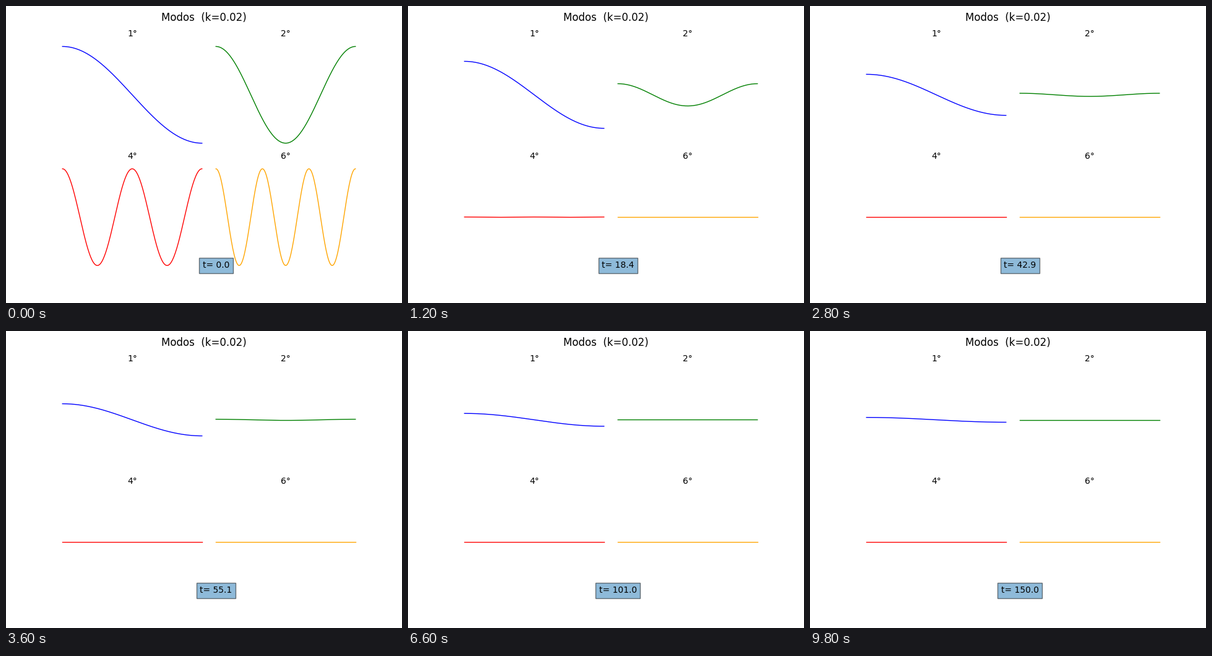
Animation, 640 px wide and 480 px high, one loop 10 s. Source, as a matplotlib script:

```python
import numpy as np
import matplotlib.pyplot as plt
from matplotlib.animation import FuncAnimation

K = 0.02
FRAMES = 50
MODES = {1: "blue", 2: "green", 4: "red", 6: "orange"}

x = np.linspace(0, 1, 200)
times = np.linspace(0, 150, FRAMES)


def mode(n, t):
    """Cosine mode n, decaying at a rate K n^2."""
    return np.cos(n * np.pi * x) * np.exp(-K * n**2 * t)


plt.rcParams["font.family"] = "DejaVu Sans"
fig, axes = plt.subplots(2, 2, figsize=(6.4, 4.8), dpi=100)
fig.subplots_adjust(left=0.125, right=0.9, bottom=0.11, top=0.88,
                    wspace=0, hspace=0.15)
fig.suptitle(f"Modos  (k={K})", fontsize=12)

lines = {}
for ax, (n, color) in zip(axes.flat, MODES.items()):
    lines[n], = ax.plot(x, mode(n, 0), color=color, lw=1)
    ax.set_xlim(-0.05, 1.05)
    ax.set_ylim(-1.1, 1.1)
    ax.set_title(f"{n}°", fontsize=10)
    ax.axis("off")

clock = axes[1, 1].text(0, -1, "t= 0.0", fontsize=10, ha="center",
                        va="center", bbox={"facecolor": "tab:blue", "alpha": 0.5})


def update(i):
    t = times[i]
    for n, line in lines.items():
        line.set_ydata(mode(n, t))
    clock.set_text(f"t= {t:.1f}")
    return [*lines.values(), clock]


anim = FuncAnimation(fig, update, frames=FRAMES, interval=200,
                     init_func=lambda: update(0), repeat=True, repeat_delay=0)
plt.show()
```
